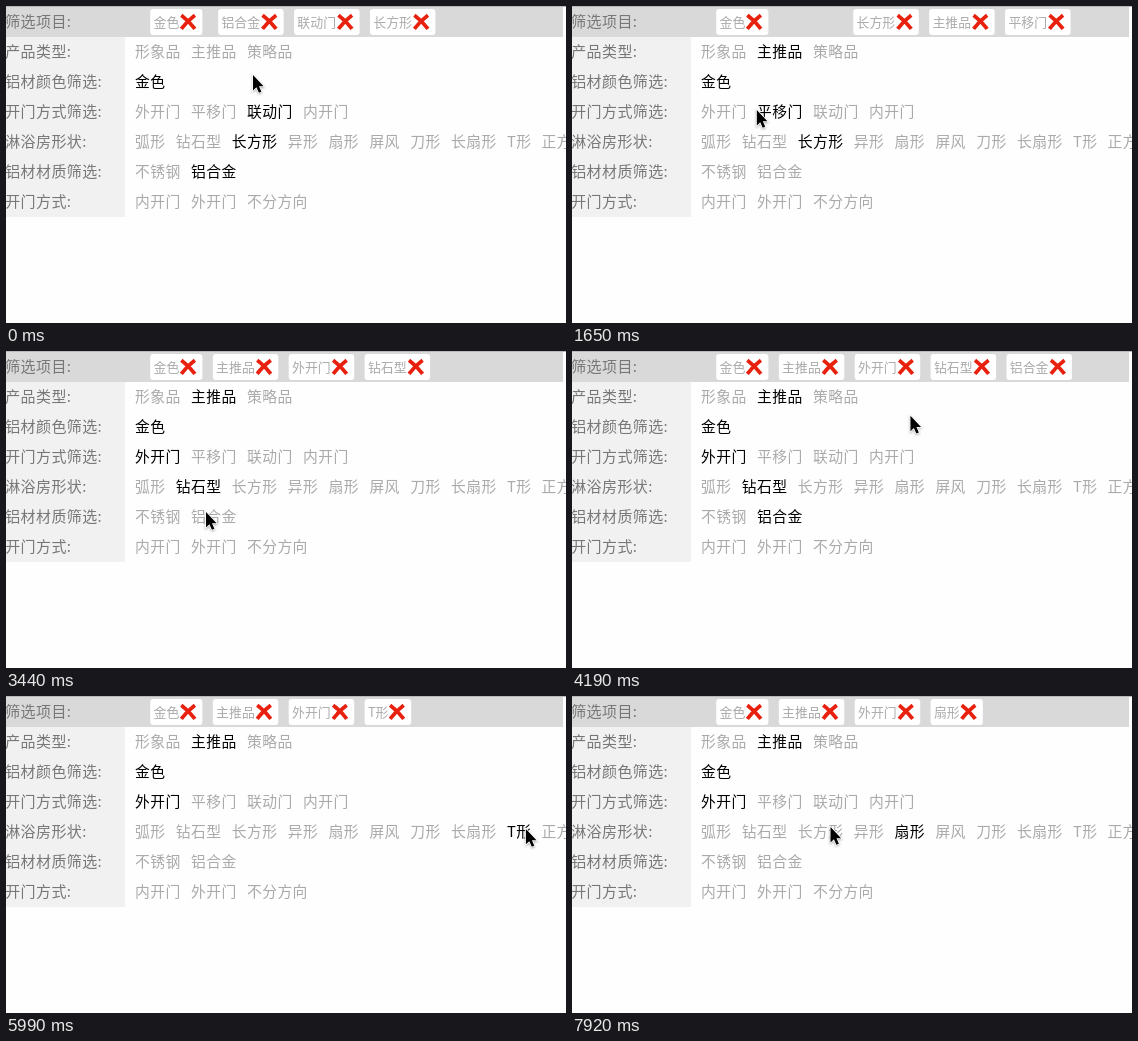
These frames come from a looping animation (560 px wide and 317 px high, 8000 ms). An HTML page:

```html
<!DOCTYPE html>
<html lang="zh-CN">
<head>
<meta charset="utf-8">
<title>筛选</title>
<style>
html, body { margin: 0; width: 100%; height: 100%; overflow: hidden; background: #fefefe; }
svg { display: block; width: 100%; height: 100%; }
text { font-family: "Noto Sans CJK SC", "Noto Sans CJK", sans-serif; white-space: pre; }
.title, .item { letter-spacing: 0.4px; }
.title { font-size: 15px; fill: #777; }
.item { font-size: 14.8px; }
.chip { font-size: 12.9px; fill: #aaa; }
</style>
</head>
<body>
<svg id="stage" viewBox="0 0 560 317"></svg>
<script>
const LOOP = 8000, TICK = 149.6, LAST = 53;
const EM = 15.2, CHIP_EM = 13.3, GAP = 10.4;
const stage = document.getElementById('stage');

const rows = [
  ['产品类型:', '形象品 主推品 策略品'],
  ['铝材颜色筛选:', '金色'],
  ['开门方式筛选:', '外开门 平移门 联动门 内开门'],
  ['淋浴房形状:', '弧形 钻石型 长方形 异形 扇形 屏风 刀形 长扇形 T形 正方形'],
  ['铝材材质筛选:', '不锈钢 铝合金'],
  ['开门方式:', '内开门 外开门 不分方向']
].map(([title, names]) => ({ title, names: names.split(' ') }));

// pointer stops in ticks, with the option toggled on arrival
const stops = [
  { at: -1.34, x: 247, y: 69, toggle: '不锈钢' },
  { at: 0, x: 247, y: 69 },
  { at: 3.9, x: 258, y: 17, toggle: '铝合金' },
  { at: 7, x: 258, y: 17 },
  { at: 8.9, x: 207, y: 44, toggle: '主推品' },
  { at: 10.87, x: 185, y: 104, toggle: '平移门' },
  { at: 13.9, x: 151, y: 106, toggle: '外开门' },
  { at: 17.4, x: 170, y: 144, toggle: '钻石型' },
  { at: 23, x: 200, y: 161 },
  { at: 24.9, x: 200, y: 161, toggle: '铝合金' },
  { at: 30, x: 410, y: 15 },
  { at: 31.4, x: 410, y: 15, toggle: '钻石型' },
  { at: 33, x: 423.5, y: 14 },
  { at: 34, x: 423.5, y: 14 },
  { at: 35.9, x: 412, y: 15, toggle: '铝合金' },
  { at: 39.9, x: 520, y: 133, toggle: 'T形' },
  { at: 47, x: 351.5, y: 28.5 },
  { at: 49.9, x: 345, y: 131, toggle: '扇形' },
  { at: LAST, x: 258.5, y: 131 }
];

const alive = (c, n) => n >= c.from && n < c.to;
const ease = p => p * p * (3 - 2 * p);
const ems = s => [...s].reduce((n, c) => n + (c === 'T' ? 0.58 : 1), 0);
const newChip = (name, from) => ({
  name, from, to: Infinity,
  row: rows.findIndex(r => r.names.includes(name)),
  width: ems(name) * CHIP_EM + 25.6
});

// a click drops a chosen option, or replaces the choice in its row
const chips = ['金色', '不锈钢', '铝合金', '联动门', '长方形'].map(s => newChip(s, -Infinity));
for (const { at, toggle } of stops) {
  if (!toggle) continue;
  const next = newChip(toggle, at);
  const same = chips.find(c => c.name === toggle && alive(c, at));
  const old = same || chips.find(c => c.row === next.row && alive(c, at));
  if (old) old.to = at;
  if (!same) chips.push(next);
}

function add(parent, tag, attrs, text) {
  const el = document.createElementNS('http://www.w3.org/2000/svg', tag);
  for (const k in attrs) el.setAttribute(k, attrs[k]);
  if (text) el.textContent = text;
  parent.appendChild(el);
  return el;
}
const rect = (parent, x, y, width, height, fill, rx = 0) =>
  add(parent, 'rect', { x, y, width, height, fill, rx });
const label = (parent, cls, x, y, text) => add(parent, 'text', { class: cls, x, y }, text);

rect(stage, 0, 0, 560, 317, '#fefefe');
rect(stage, 0, 0, 557, 31, '#d9d9d9');
rect(stage, 0, 0, 560, 1, '#b9b9b9');
rect(stage, 0, 31, 119, 180, '#f1f1f1');
label(stage, 'title', -0.8, 21.1, '筛选项目:');

const items = [];
rows.forEach(({ title, names }, row) => {
  const y = 51.1 + row * 30;
  label(stage, 'title', -0.8, y, title);
  let x = 129;
  for (const name of names) {
    items.push({ name, row, el: label(stage, 'item', x, y, name) });
    x += ems(name) * EM + GAP;
  }
});

for (const c of chips) {
  c.el = add(stage, 'g', {});
  rect(c.el, 0, 3, c.width, 26, '#fff', 3);
  label(c.el, 'chip', 3.3, 20.6, c.name);
  add(c.el, 'path', {
    transform: `translate(${c.width - 14.3} 16)`,
    d: 'M-6.8-6.8Q1-1 6.8 6.8M6.8-6.8Q-1-1-6.8 6.8',
    fill: 'none', stroke: '#e8210e', 'stroke-width': 3.8
  });
}

const pointer = add(stage, 'path', {
  d: 'M0 0V15.4L3.4 12.2 5.9 17.8 8.4 16.7 6 11.2H10.6Z',
  fill: '#000', stroke: '#fff', 'stroke-width': 1.6, 'paint-order': 'stroke',
  style: 'filter: drop-shadow(0 1px 1px rgba(0,0,0,.3))'
});

// share of its room a removed chip still takes up
function room(c, n) {
  if (n < c.from) return 0;
  return 1 - ease(Math.min(1, Math.max(0, (n - c.to) / 1.6)));
}

function pointerAt(n) {
  const i = stops.findIndex(s => s.at >= n);
  const a = stops[i - 1], b = stops[i];
  const p = ease((n - a.at) / (b.at - a.at));
  return [a.x + (b.x - a.x) * p, a.y + (b.y - a.y) * p];
}

function render(time) {
  const n = Math.min(LAST, Math.floor((time % LOOP + 10) / TICK));
  let x = 144.2;
  for (const c of chips) {
    c.el.setAttribute('transform', `translate(${x.toFixed(2)} 0)`);
    c.el.setAttribute('display', alive(c, n) ? 'inline' : 'none');
    x += (c.width + GAP) * room(c, n);
  }
  for (const it of items) {
    const on = chips.some(c => c.name === it.name && c.row === it.row && alive(c, n));
    it.el.setAttribute('fill', on ? '#000' : '#aaa');
  }
  pointer.setAttribute('transform', `translate(${pointerAt(n)})`);
}

let start;
function loop(now) {
  start ??= now;
  render(now - start);
  requestAnimationFrame(loop);
}
render(0);
requestAnimationFrame(loop);
</script>
</body>
</html>
```
